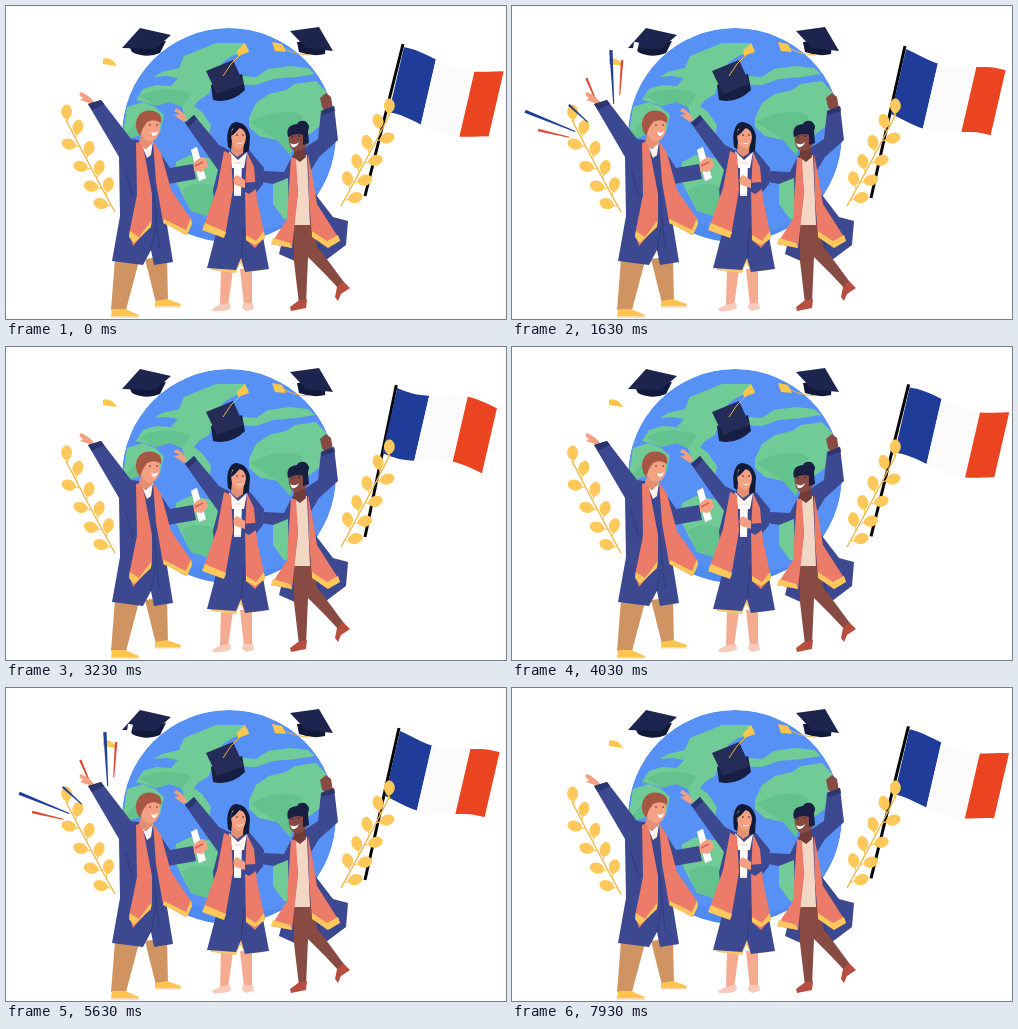
An HTML page that plays this animation: 500 px wide and 313 px high, repeating every 8.01 s.

```html
<!DOCTYPE html>
<html lang="en">
<head>
<meta charset="utf-8">
<title>Graduation</title>
<style>
html, body { margin: 0; width: 100%; height: 100%; overflow: hidden; background: #fff; }
svg { display: block; width: 100vw; height: 100vh; }
</style>
</head>
<body>
<svg viewBox="0 0 500 313" preserveAspectRatio="none">
  <defs>
    <clipPath id="disc"><circle cx="223" cy="129" r="107"/></clipPath>
    <path id="leaf" d="M-.6 0L-.6-4C-7-7-7-15-2-18.500Q0-19.500 2-18.500C7-15 6-7 .6-4L.6 0Z"/>
  </defs>

  <g id="globe" clip-path="url(#disc)">
    <circle cx="223" cy="129" r="107" fill="#5791f6"/>
    <path d="M115 150C150 210 210 245 290 215L270 245H130Z" fill="#4a85ee" opacity=".6"/>
    <g fill="#70cb96">
      <path d="M130 94L137 83L150 79L165 80L172 72L160 70L148 71L156 66L173 62L178 50L210 37L239 37L243 44L226 50L217 56L213 62L215 75L206 79L203 88L193 94L188 100L196 106L205 119L203 130L190 125L180 115L176 101L164 96L150 100L138 96Z"/>
      <path d="M121 101L137 96L149 101L158 109L154 126L139 128L116 134Z"/>
      <path d="M170 156L184 149L207 153L217 165L216 184L206 197L201 210L185 205L176 188L169 174Z"/>
      <path d="M228 78L237 70L250 71L262 63L284 60L302 62L309 68L290 71L267 73L250 79Z"/>
      <path d="M243 112L250 97L263 88L280 84L289 78L310 75L322 88L329 108L314 120L300 131L290 134L284 149L271 134L253 130L243 121Z"/>
      <path d="M267 178L278 170L304 177L311 194L299 214L278 213L267 198Z"/>
    </g>
    <g fill="#5fbd8b" opacity=".65">
      <path d="M134 90Q157 78 185 88L176 101L164 96L150 100Z"/>
      <path d="M116 134Q130 110 150 111L154 126L139 128Z"/>
      <path d="M244 116Q275 99 297 110L290 134L284 149L271 134Z"/>
      <path d="M176 184Q194 171 215 185L206 197L201 210L185 205Z"/>
    </g>
  </g>

  <g id="laurels" fill="#ffc85a"></g>

  <g id="caps" stroke-linejoin="round">
    <path d="M123 40L126 46Q140 53 154 47L160 35Z" fill="#12183a"/>
    <path d="M116 42L134 22L165 29L149 43Z" fill="#1d254f"/>
    <path d="M97 53Q105 50 111 60L97 58Z" fill="#ffc64d"/>
    <path d="M291 36L293 46Q307 51 319 48L320 33Z" fill="#12183a"/>
    <path d="M284 25L313 21L327 45L300 42Z" fill="#1d254f"/>
    <path d="M304 49Q290 49 277 42" fill="none" stroke="#ecb54c"/>
    <path d="M266 36L276 38L280 46L269 45Z" fill="#ffc64d"/>
    <path d="M205 79L207 94Q225 98 239 84L236 68Z" fill="#171e44"/>
    <path d="M200 65L227 54L238 78L211 88Z" fill="#242c57"/>
    <path d="M217 70Q224 57 235 48" fill="none" stroke="#ecb54c"/>
    <path d="M231 45L239 37L243 46L232 50Z" fill="#ffc64d"/>
  </g>

  <g id="fireworks"></g>

  <g id="flag">
    <path id="pole" fill="none" stroke="#050507" stroke-width="3"/>
    <path class="panel" fill="#1f3d98"/>
    <path class="panel" fill="#fbfbfb"/>
    <path class="panel" fill="#ea4520"/>
  </g>
  <g id="frontLaurel" fill="#ffc85a"></g>

  <g id="man" stroke-linejoin="round">
    <path d="M109 253L105 304L120 304L133 255ZM139 253L150 297L162 297L161 250Z" fill="#d09463"/>
    <path d="M106 303L119 303L133 309L132 312L105 311ZM149 295L161 293L175 298L174 301L149 301Z" fill="#ffc44c"/>
    <path d="M105 311H133M149 301H175" stroke="#f3e5d5" stroke-width="1.500"/>
    <path d="M90 99Q85 90 75 86Q71 88 77 92L74 94L83 97L87 102Z" fill="#f4a183"/>
    <path d="M82 98L95 94L125 133L147 136L164 162L187 158L190 173L162 178L154 169L160 213L167 256L148 259L145 244L137 259L106 255L114 210L113 151Z" fill="#3c4890"/>
    <path d="M82 98L95 94L98 98L86 104Z" fill="#2b356f"/>
    <path d="M147 180L153 242M119 163L127 191M145 244L149 222" fill="none" stroke="#303c7c"/>
    <path d="M134 135L140 143L147 135L145 149L141 152Z" fill="#fff4ec"/>
    <path d="M130 137L136 135L146 188L146 218L127 240L123 228L131 189Z" fill="#ed7b69"/>
    <path d="M147 135L155 147L165 184L185 213L180 229L157 216L150 176Z" fill="#ed7b69"/>
    <path d="M124 225L133 231L145 215L145 221L128 237L123 231ZM158 213L180 224L185 212L186 218L181 229L157 217Z" fill="#ffc85c"/>
    <path d="M136 126L149 126L146 138L139 143L133 136Z" fill="#e58f75"/>
    <path d="M134 112Q143 105 153 114L154 125Q151 136 142 135Q132 131 134 112Z" fill="#f4a183"/>
    <path d="M134 130Q126 119 133 109Q140 102 150 106Q157 109 155 117Q149 112 141 116L137 122Z" fill="#a65743"/>
    <path d="M145 126Q149 128 152 125Q151 130 147 130Z" fill="#fff"/>
    <path d="M143 119h2M150 119h2" stroke="#60352f"/>
    <path d="M185 144L191 141L200 172L193 175Z" fill="#fff"/>
    <path d="M185 144L191 141M193 175L200 172M189 158L197 156" stroke="#d5d6df"/>
    <path d="M188 157Q193 150 200 153L202 160L196 166L188 165Z" fill="#f4a183"/>
    <path d="M189 160L197 156" stroke="#df5a51" stroke-width="1.500"/>
  </g>

  <g id="middleStudent" stroke-linejoin="round">
    <path d="M215 263L214 300L222 300L227 264ZM234 263L238 299L246 299L246 262Z" fill="#f5ab90"/>
    <path d="M206 303Q214 297 224 297L225 302Q220 306 207 305ZM237 297L247 297L248 303L240 305L236 302Z" fill="#f6cbbb"/>
    <path d="M181 113Q177 105 170 102L168 105L174 108L168 109L178 116Z" fill="#f4a183"/>
    <path d="M204 251L205 264L230 267L234 257L240 266L258 264L257 248Z" fill="#f7c86e"/>
    <path d="M179 117L188 109L213 139L223 144L244 145L258 162L257 178L249 188L263 263L239 266L235 252L230 264L201 262L211 224L207 184L212 164Z" fill="#3c4890"/>
    <path d="M179 117L188 109L191 113L183 121Z" fill="#2b356f"/>
    <path d="M235 252L238 220M212 175L213 202" stroke="#303c7c"/>
    <path d="M223 145L232 154L241 146L238 162L226 162Z" fill="#fff6ee"/>
    <path d="M218 145L225 148L227 184L219 230L197 222L211 182Z" fill="#ed7b69"/>
    <path d="M241 146L248 161L251 194L259 231L249 242L240 234L239 184Z" fill="#ed7b69"/>
    <path d="M199 217L220 226L218 232L196 224ZM240 229L250 235L258 225L259 232L249 239L240 234Z" fill="#ffc85c"/>
    <path d="M222 141Q219 120 229 116Q241 116 244 130L243 145L232 149Z" fill="#111a38"/>
    <path d="M226 135L238 135L237 147L231 151L225 146Z" fill="#e58f75"/>
    <path d="M226 123Q239 119 240 131Q239 143 232 143Q223 138 226 123Z" fill="#f4a183"/>
    <path d="M225 130Q225 120 235 120Q229 128 225 130Z" fill="#111a38"/>
    <path d="M230 136Q235 139 238 135Q235 141 230 136Z" fill="#fff"/>
    <path d="M230 129h2M236 129h2" stroke="#392936"/>
    <path d="M257 178L243 188L236 184L236 177L249 176Z" fill="#3c4890"/>
    <path d="M228 156L236 156L235 190L228 190Z" fill="#fff"/>
    <path d="M228 157H236M228 189H235M229 178H236" stroke="#d5d6df"/>
    <path d="M239 182L229 179Q225 172 231 169L239 174Z" fill="#f4a183"/>
  </g>

  <g id="rightStudent" stroke-linejoin="round">
    <path d="M316 101L314 92L320 87L325 91L327 103L321 108Z" fill="#874b43"/>
    <path d="M315 105L328 100L332 134L313 151L304 166L307 185L327 211L342 215L340 239L316 257L303 246L291 256L273 248L283 207L282 172L267 178L256 176L258 165L278 166L286 150L312 133Z" fill="#3c4890"/>
    <path d="M315 105L328 100L329 105L316 109Z" fill="#2b356f"/>
    <path d="M306 190L325 222M316 257L311 228" stroke="#303c7c"/>
    <path d="M288 215L288 255L293 298L300 298L302 251L319 268L334 284L340 279L326 260L311 240L305 215Z" fill="#874b43"/>
    <path d="M292 295L301 293L300 302L285 305L284 301ZM331 281L337 275L344 282L335 288L332 295L329 291Z" fill="#b74e40"/>
    <path d="M288 151L301 149L304 219L288 219L292 185Z" fill="#f2d7c4"/>
    <path d="M285 151L290 153L292 187L286 242L275 240L265 238L281 213L283 181Z" fill="#ed7b69"/>
    <path d="M302 148L306 168L311 198L334 234L322 242L306 230L303 193Z" fill="#ed7b69"/>
    <path d="M267 232L284 237L286 242L276 240L265 238ZM306 225L321 235L332 229L334 235L322 242L306 231Z" fill="#ffc85c"/>
    <path d="M289 141L298 139L300 151L294 156L287 151Z" fill="#713c38"/>
    <path d="M283 125Q291 119 300 125L302 137Q297 146 289 145Q281 142 283 125Z" fill="#874b43"/>
    <path d="M282 131Q279 119 291 118Q293 114 299 115Q305 119 302 125L303 137L297 139L297 129Q291 126 282 131Z" fill="#191f42"/>
    <path d="M284 137Q289 140 293 136Q291 142 286 141Z" fill="#fff"/>
    <path d="M285 131h2M292 130h2" stroke="#34202a"/>
  </g>
</svg>

<script>
const $ = id => document.getElementById(id);
const svgNode = (tag, parent, attributes) => {
  const node = document.createElementNS("http://www.w3.org/2000/svg", tag);
  Object.entries(attributes).forEach(([key, value]) => node.setAttribute(key, value));
  parent.append(node);
  return node;
};

// Both branches share one shape; the right one is its mirror image.
function drawLaurel(parent, transform) {
  const branch = svgNode("g", parent, { transform });
  svgNode("path", branch, {
    d: "M109 206Q90 172 60 114", fill: "none", stroke: "#edb444", "stroke-width": 1.3
  });
  const addLeaf = (t, angle) => {
    const x = 109 - 38 * t - 11 * t * t;
    const y = 206 - 68 * t - 24 * t * t;
    svgNode("use", branch, { href: "#leaf", transform: `translate(${x} ${y}) rotate(${angle})` });
  };
  for (let i = 0; i < 4; i++) {
    addLeaf(.22 + i * .205, 12);
    addLeaf(.08 + i * .225, -75);
  }
  addLeaf(.97, -5);
}

drawLaurel($("laurels"), "");
drawLaurel($("frontLaurel"), "translate(444 -6) scale(-1 1)");

const mix = (a, b, t) => a + (b - a) * t;
const sample = (keys, time) => {
  const next = keys.findIndex(key => key[0] > time);
  if (next < 0) return keys.at(-1)[1];
  if (next === 0) return keys[0][1];
  const [t0, a] = keys[next - 1], [t1, b] = keys[next];
  return mix(a, b, (time - t0) / (t1 - t0));
};

const burst = { x: 104, y: 142 };
const blue = "#203f97", red = "#df4b32";
const rays = [
  { angle: 202, color: blue, width: 3.4 },
  { angle: 193, color: red, width: 2.6, short: true },
  { angle: 222.5, color: blue, width: 2.4, short: true, reach: .8 },
  { angle: 247, color: red, width: 2.4, short: true, reach: .95 },
  { angle: 267, color: blue, width: 3.4 },
  { angle: 274, color: red, width: 2.6, short: true, reach: 1.1 },
  { angle: 281, color: "#fff", width: 5, reach: 1.1 }
].map(ray => ({ reach: 1, ...ray, node: svgNode("path", $("fireworks"), { fill: ray.color }) }));

const longHead = [[2, 30], [5, 41], [17, 74], [22, 90], [33, 98], [39, 109], [52, 117], [65, 117]];
const longTail = [[2, 30], [33, 44], [49, 54], [61, 107], [64, 117]];
const shortHead = [[2, 30], [17, 62], [33, 80], [46, 94]];
const shortTail = [[2, 30], [20, 34], [33, 48], [46, 94]];

function drawFireworks(step) {
  for (const { angle, width, short, reach, node } of rays) {
    const head = reach * sample(short ? shortHead : longHead, step);
    const tail = reach * sample(short ? shortTail : longTail, step);
    const a = angle * Math.PI / 180, c = Math.cos(a), s = Math.sin(a);
    const point = (r, side) =>
      `${burst.x + r * c - side * s} ${burst.y + r * s + side * c}`;
    const visible = step > 2 && head - tail > .3;
    node.setAttribute("d", visible
      ? `M${point(tail, .5)}L${point(head, width / 2)}L${point(head, -width / 2)}L${point(tail, -.5)}Z`
      : "");
  }
}

const panels = [...document.querySelectorAll(".panel")];
const seams = [0, .96, 2.12, 3];
const poleX = [[0, 397], [9, 394], [21, 389], [33, 393], [40, 397]];
const poleY = [[0, 38], [9, 33], [21, 37], [33, 40], [40, 38]];

function drawFlag(step) {
  const time = step % 40;
  const x = sample(poleX, time), y = sample(poleY, time);
  const cycle = 2 * Math.PI / 40;
  const phase = u => cycle * (time + 11 - 12 * u);
  const rise = u => 7.7 * u + 9 / (cycle * 12) * (Math.sin(phase(0)) - Math.sin(phase(u)));
  const top = u => [x + 1 + u * 33.2, y + 3 + rise(u)];
  const bottom = u => {
    const [px, py] = top(u);
    return [px - 15, py + 65];
  };
  $("pole").setAttribute("d", `M${x} ${y}L359 ${y + 152}`);
  panels.forEach((panel, index) => {
    const steps = Array.from({ length: 9 }, (_, i) => mix(seams[index], seams[index + 1], i / 8));
    panel.setAttribute("d", "M" + [...steps.map(top), ...steps.reverse().map(bottom)].join("L") + "Z");
  });
}

function render(now) {
  const elapsed = now % 8010;
  const pair = Math.min(79, Math.floor(elapsed / 100));
  const step = pair * 2 + (elapsed - pair * 100 >= 30 ? 1 : 0);
  drawFireworks(step % 80);
  drawFlag(step);
}

const start = performance.now();
function tick() {
  render(performance.now() - start);
  requestAnimationFrame(tick);
}
tick();
</script>
</body>
</html>
```
